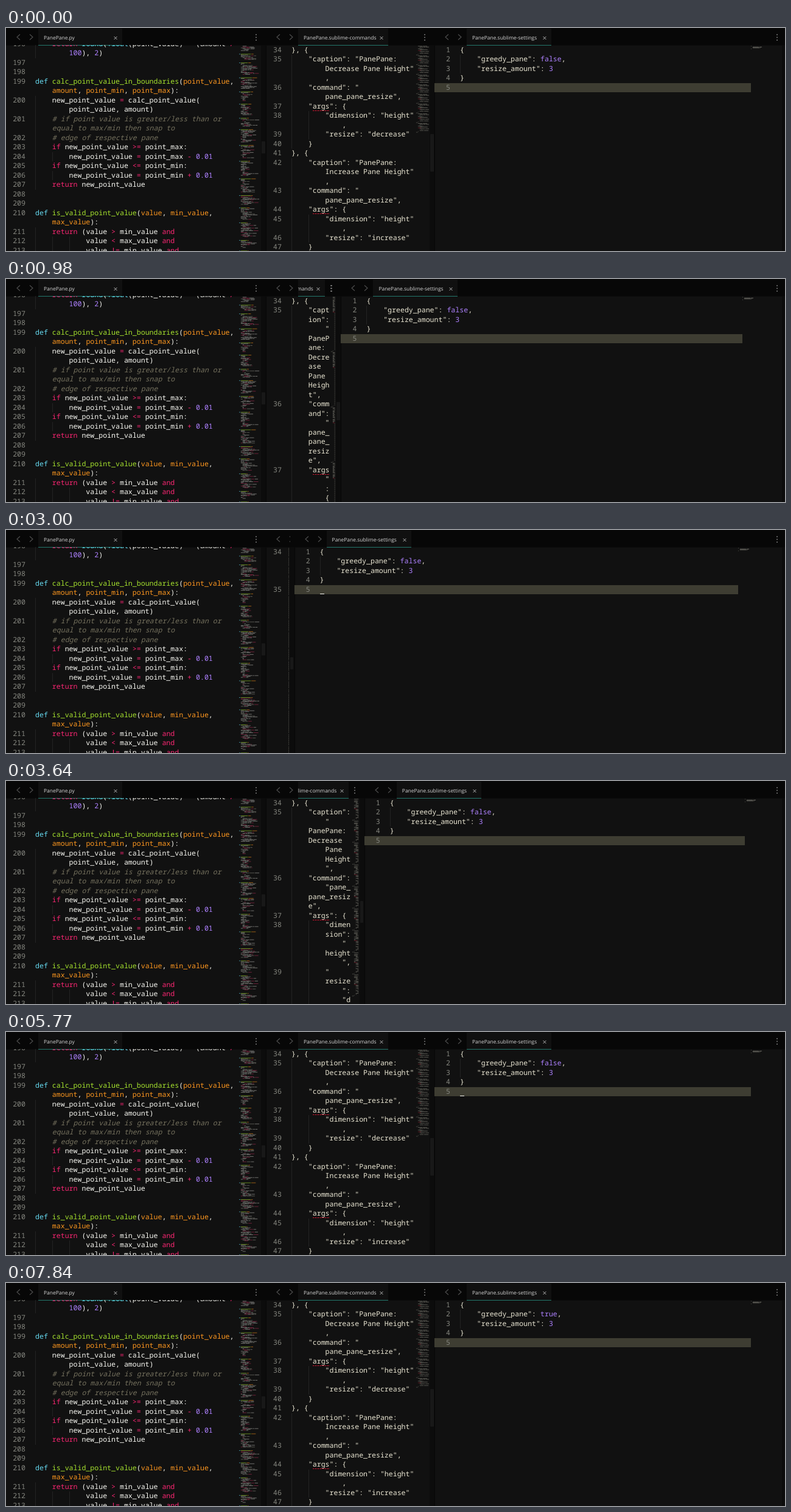
Animation, 1280 px wide and 368 px high, one loop 8000 ms. Source, as an HTML page with a canvas:

```html
<!DOCTYPE html>
<html lang="en">
<head>
<meta charset="utf-8">
<title>Pane resizing</title>
<style>
html, body { margin: 0; width: 100%; height: 100%; overflow: hidden; background: #111; }
#stage { position: relative; width: 1280px; height: 368px; overflow: hidden; background: #111; text-rendering: geometricPrecision; }
.pane { position: absolute; top: 0; height: 368px; overflow: hidden; background: #111; }
.pane + .pane { box-shadow: inset 1px 0 #060606; }
.bar { position: absolute; left: 0; right: 0; top: 0; height: 28px; background: #070707; border-bottom: 1px solid #0a0a0a; }
.nav { position: absolute; left: 0; top: 0; height: 28px; overflow: hidden; }
.bar svg { position: absolute; left: 0; top: 0; fill: none; }
.strip { position: absolute; left: 53px; top: 0; height: 29px; overflow: hidden; }
.tab { position: absolute; top: 1px; height: 27px; background: #101010; border-bottom: 1px solid #23776b; color: #d6d6d6; font: 8.45px/31px "Open Sans", "Noto Sans", sans-serif; white-space: pre; }
.tab span { position: absolute; left: 9px; top: 0; }
.dots { position: absolute; top: 9.5px; width: 2.4px; height: 2.4px; border-radius: 50%; background: #7d7d7d; box-shadow: 0 4.5px #7d7d7d, 0 9px #7d7d7d; }
.code { position: absolute; left: 0; top: 28px; bottom: 0; overflow: hidden; color: #f8f8f2; font: 500 11.58px/15.5px "Noto Sans Mono", "DejaVu Sans Mono", monospace; font-variant-ligatures: none; }
.row { position: absolute; left: 0; width: 100%; height: 15.5px; white-space: pre; }
.num { position: absolute; left: 0; text-align: right; color: #85867f; font-weight: 400; }
.text { position: absolute; }
.guide { position: absolute; top: 0; width: 1px; height: 15.5px; background: #232323; }
.lit { background: #3e3d32; }
.k { color: #f92672; } .c { color: #66d9ef; } .f { color: #a6e22e; }
.p { color: #fd971f; } .n { color: #ae81ff; } .s { color: #e9e5d2; }
.r { color: #75715e; font-style: italic; } .t { color: #66d9ef; font-style: italic; }
.typo { background: repeating-linear-gradient(90deg, #d01530 0 2px, #5c0d18 2px 4px) 0 100% / 100% 1.2px no-repeat; }
.map { position: absolute; top: 29px; }
.track { position: absolute; right: 0; top: 29px; bottom: 0; width: 8px; background: #0c0c0c; }
.thumb { position: absolute; right: 1.5px; width: 5.5px; background: #181818; border-radius: 1px; }
#caret { position: absolute; left: 42px; top: 105px; width: 7px; height: 1px; background: #f8f8f0; }
</style>
</head>
<body>
<div id="stage"></div>
<script>
const LOOP = 8000, CHAR = 6.95, LINE = 15.5, WIDTH = 1280, MIDDLE = 427;
const RIGHT = 1283; // the last pane reaches slightly past the stage
const STEP = WIDTH * 0.03;

// [time, number of resize steps to the left]
const moves = [[0, 0], [150, 1], [430, 2], [700, 3], [980, 4], [1140, 5], [1440, 6],
  [3120, 5], [3390, 4], [3640, 3], [4060, 2], [4210, 1], [4520, 0]];
// [time, caret opacity]
const blinks = [[0, 0], [550, 1], [980, 0], [1590, .5], [1720, 1], [2060, .5], [2200, 0],
  [2570, .5], [2700, 1], [3120, .5], [3250, 0], [3790, 1], [4060, 0], [4650, .5], [4790, 1],
  [5100, .5], [5250, 0], [5770, 1], [6080, 0], [7290, 1], [7700, .5], [7840, 0]];
const TOGGLE = 7150;

// x[...] wraps its content in a span of class x
const python = [
  ['196', '    k[return] c[round](t[float](point_value) k[*] (amount k[/]'],
  ['', '        n[100]), n[2])'],
  ['197', ''], ['198', ''],
  ['199', 'c[def] f[calc_point_value_in_boundaries](p[point_value],'],
  ['', '    p[amount], p[point_min], p[point_max]):'],
  ['200', '    new_point_value k[=] calc_point_value('],
  ['', '        point_value, amount)'],
  ['201', '    r[# if point value is greater/less than or]'],
  ['', '    r[equal to max/min then snap to]'],
  ['202', '    r[# edge of respective pane]'],
  ['203', '    k[if] new_point_value k[&gt;=] point_max:'],
  ['204', '        new_point_value k[=] point_max k[-] n[0.01]'],
  ['205', '    k[if] new_point_value k[&lt;=] point_min:'],
  ['206', '        new_point_value k[=] point_min k[+] n[0.01]'],
  ['207', '    k[return] new_point_value'],
  ['208', ''], ['209', ''],
  ['210', 'c[def] f[is_valid_point_value](p[value], p[min_value],'],
  ['', '    p[max_value]):'],
  ['211', '    k[return] (value k[&gt;] min_value k[and]'],
  ['212', '            value k[&lt;] max_value k[and]'],
  ['213', '            value k[!=] min_value k[and]']
];

const command = verb => [
  `    "caption": "PanePane: ${verb} Pane Height",`,
  '    "command": "pane_pane_resize",',
  '    "args": {',
  '        "dimension": "height",',
  `        "resize": "${verb.toLowerCase()}"`,
  '    }',
  '}, {'
];
const commands = ['}, {', ...command('Decrease'), ...command('Increase')];
const settings = value => ['{', `    "greedy_pane": ${value},`, '    "resize_amount": 3', '}', ''];

const spans = s => s.replace(/\b(\w)\[(.*?)\]/g, '<span class="$1">$2</span>');
const json = s => s
  .replace(/\b(true|false|\d+)\b/g, '<span class="n">$1</span>')
  .replace(/\bargs\b/, '<span class="typo">args</span>');
const indent = s => Math.max(0, s.search(/\S/));
const at = (list, t) => list.filter(e => e[0] <= t).pop()[1];

// Word wrap with a hanging indent, as the editor does it
function wrap(line, cols) {
  const base = indent(line), fit = base < cols ? base : 0, rows = [];
  let row = ' '.repeat(fit);
  const next = n => { rows.push(row); row = ' '.repeat(n); };
  for (let word of line.trim().match(/\w+:?|\W/g) || []) {
    if (row.length + word.length > cols) {
      if (word === ' ' && cols > 4) continue;
      const start = [base + 4, base].find(n => n + word.length <= cols);
      if (start !== undefined) next(start);
      else while (row.length + word.length > cols) {
        const cut = cols - row.length;
        row += word.slice(0, cut);
        word = word.slice(cut);
        next(fit);
      }
    }
    row += word;
  }
  return [...rows, row];
}

const chevron = (x, d) => `<path d="M${x - d} 10.5L${x + d} 15L${x - d} 19.5" stroke="#4c4c4c" stroke-width="1.2"/>`;

function makePane(title, tabWidth) {
  const el = document.createElement('div');
  el.className = 'pane';
  const x = tabWidth - 11;
  el.innerHTML = `<div class="bar"><div class="nav"><svg width="60" height="28">${chevron(20.5, -2.5)}${chevron(41.5, 2.5)}</svg></div>
    <div class="strip"><div class="tab" style="width:${tabWidth}px"><span>${title}</span>
    <svg width="${tabWidth}" height="27"><path d="M${x - 2.5} 13l5 5m0 -5l-5 5" stroke="#b5b5b5"/></svg></div></div>
    <i class="dots"></i></div><div class="code"></div><canvas class="map" height="339"></canvas>
    <div class="track"></div><div class="thumb"></div>`;
  document.getElementById('stage').append(el);
  const find = c => el.querySelector('.' + c);
  return { el, tabWidth, nav: find('nav'), strip: find('strip'), tab: find('tab'), dots: find('dots'),
    code: find('code'), map: find('map'), thumb: find('thumb') };
}

function place(p, left, width, mapLeft, thumb) {
  p.el.style.left = left + 'px';
  p.el.style.width = width + 'px';
  p.nav.style.width = Math.max(0, width - 6.5) + 'px';
  const room = Math.max(0, width - 79);
  p.strip.style.width = room + 'px';
  p.tab.style.left = Math.min(0, room - p.tabWidth) + 'px';
  p.dots.style.left = width - 17 + 'px';
  p.dots.style.display = width < 60 ? 'none' : '';
  p.code.style.width = Math.min(mapLeft, width - 8) + 'px';
  p.map.style.left = mapLeft + 'px';
  p.map.width = Math.max(1, width - 8 - mapLeft);
  p.thumb.style.top = thumb[0] + 'px';
  p.thumb.style.height = thumb[1] + 'px';
}

// rows: [number, markup, depth of the indent guides]
function fill(p, rows, top, numRight, lit) {
  p.code.innerHTML = rows.map(([num, text, depth], i) => {
    let guides = '';
    for (let c = 0; c < depth; c += 4) guides += `<i class="guide" style="left:${c * CHAR}px"></i>`;
    return `<div class="row${i === lit ? ' lit' : ''}" style="top:${top - 28 + i * LINE}px">` +
      `<span class="num" style="width:${numRight}px">${num}</span>` +
      `<span class="text" style="left:${numRight + 16}px">${guides}${text}</span></div>`;
  }).join('');
}

// Tiny words: one bar per word
function mapRow(g, y, text, color) {
  for (const m of text.matchAll(/\S+/g)) {
    g.fillStyle = typeof color === 'function' ? color(m[0]) : color;
    g.fillRect(m.index * 0.72, y, m[0].length * 0.72, 0.95);
  }
}

function pythonMap(g) {
  let seed = 11;
  const rand = n => (seed = seed * 16807 % 2147483647) % n;
  const pick = a => a[rand(a.length)];
  const word = () => 'x'.repeat(2 + rand(10));
  g.globalAlpha = 0.6;
  let left = 6, depth = 8;
  for (let y = 0.5; y < 339; y += 1.45) {
    if (left-- > 0) {
      let text = ' '.repeat(depth) + word();
      for (let n = rand(4); n > 0; n--) text += ' ' + word();
      mapRow(g, y, text.slice(0, 46), () => pick(['#b8b8b2', '#b8b8b2', '#b8b8b2', '#8a8a80', '#b03058']));
      depth = pick([4, 4, 8, 8, 12]);
    } else if (left > -4) {
      continue;
    } else {
      const colors = ['#66d9ef', '#a6e22e', '#fd971f'];
      let i = 0;
      mapRow(g, y, ('def ' + 'x'.repeat(12 + rand(14)) + ' ' + word()).slice(0, 46), () => colors[i++]);
      left = 5 + rand(14);
      depth = 4;
    }
  }
}

const leftPane = makePane('PanePane.py', 138);
const midPane = makePane('PanePane.sublime-commands', 148);
const rightPane = makePane('PanePane.sublime-settings', 139);
const caret = document.createElement('div');
caret.id = 'caret';
rightPane.el.append(caret);

place(leftPane, 0, MIDDLE, 383, [187, 20]);
let depth = 0;
fill(leftPane, python.map(([n, s]) => [n, spans(s), depth = n ? indent(s) : depth]), 18.7, 32);
pythonMap(leftPane.map.getContext('2d'));

const thumbTops = [175, 197, 193, 198, 203, 207, 210];
const thumbSizes = [62, 46, 42, 36, 30, 25, 20];

function layout(step, value) {
  const edge = 704 - step * STEP, shift = step * STEP * 0.09;
  const mapLeft = edge - 30 + shift;
  const cols = Math.max(1, Math.floor((mapLeft - 469) / CHAR));

  place(midPane, MIDDLE, edge - MIDDLE, mapLeft - MIDDLE, [thumbTops[step], thumbSizes[step]]);
  const rows = commands.flatMap((line, i) => wrap(line, cols).map((s, j) =>
    [j ? '' : 34 + i, `<span class="s">${json(s)}</span>`, indent(line)]));
  fill(midPane, rows.slice(0, 23), 28.8, 26);
  let g = midPane.map.getContext('2d'), y = 0.5;
  g.globalAlpha = 0.45;
  for (let i = 0; i < 9; i++)
    for (const line of command(i % 2 ? 'Increase' : 'Decrease'))
      for (const s of wrap(line, cols)) {
        mapRow(g, y, s, w => w.startsWith('"args') ? '#c03040' : '#b4b2a4');
        y += 1.45;
      }

  const lines = settings(value), rightMap = 1224 - shift;
  place(rightPane, edge, RIGHT - edge, rightMap - edge, [0, 0]);
  fill(rightPane, lines.map((s, i) => [i + 1, `<span class="s">${json(s)}</span>`, indent(s)]), 28.8, 26, 4);
  g = rightPane.map.getContext('2d');
  g.globalAlpha = 0.5;
  lines.forEach((s, i) => mapRow(g, 0.5 + i * 1.45, s, '#c4c2b4'));
}

let shown = '';
function frame(now) {
  const t = now % LOOP, step = at(moves, t), value = t >= TOGGLE;
  const key = step + ' ' + value;
  if (key !== shown) layout(step, value);
  shown = key;
  caret.style.opacity = at(blinks, t);
  requestAnimationFrame(frame);
}
frame(performance.now());
</script>
</body>
</html>
```
